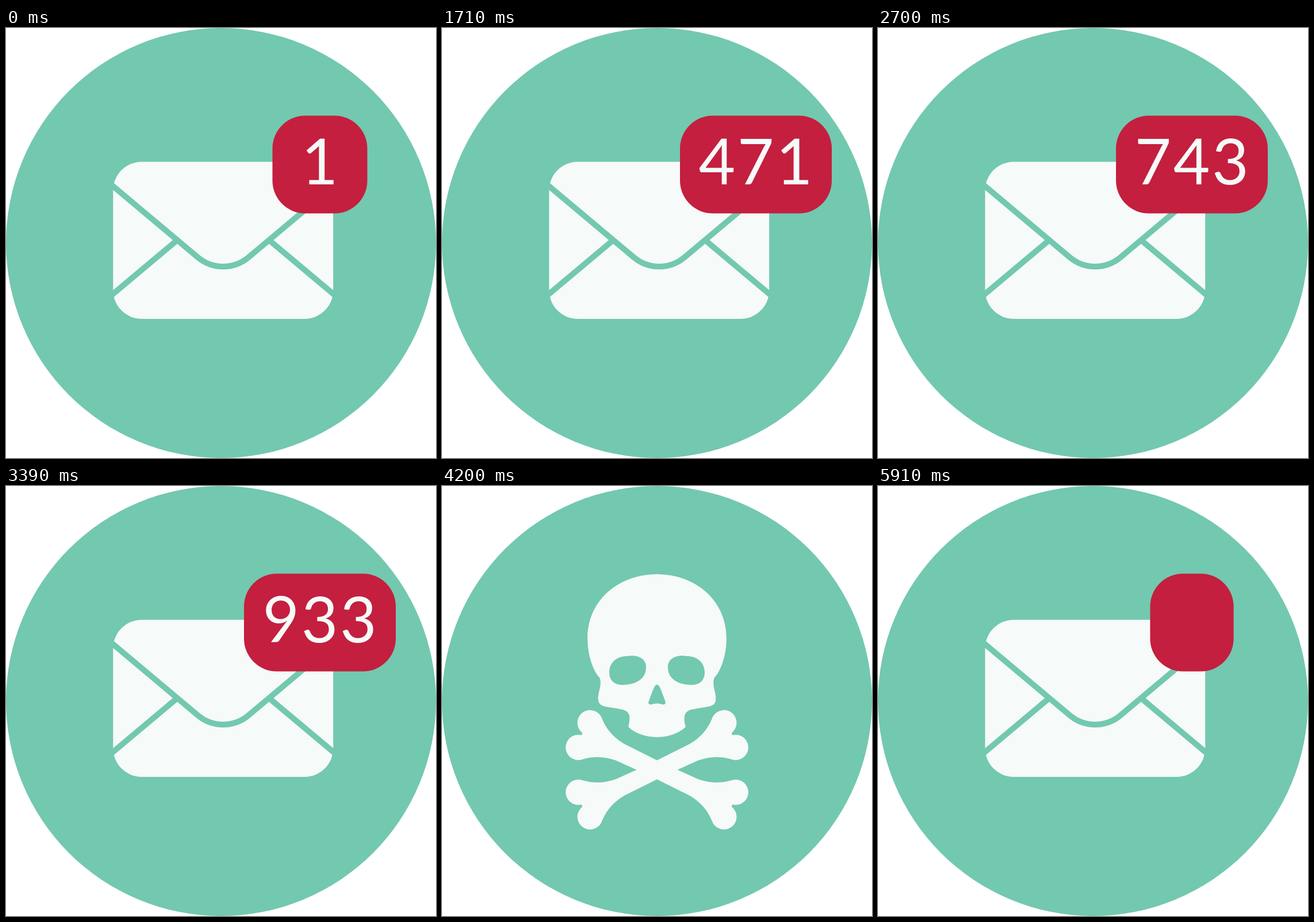
These frames come from a looping animation (748 by 748 pixels, 5.94 s). An HTML page with a canvas:

```html
<!DOCTYPE html>
<html lang="en">
<head>
<meta charset="utf-8">
<title>Inbox counter</title>
<style>
  html, body { margin: 0; width: 100%; height: 100%; overflow: hidden; background: #fff; }
  canvas { display: block; width: 748px; height: 748px; }
</style>
</head>
<body>
<canvas id="stage" width="748" height="748"></canvas>
<script>
const ctx = document.getElementById('stage').getContext('2d');
const MID = 374, STEP = 30, LOOP = 198;
const GREEN = [115, 200, 176], PAPER = [246, 250, 249], RED = [196, 31, 62];
const green = mix(GREEN, 1);

const skull = new Path2D(
  'M0 281C28 281 51 300 51 328C51 340 47 352 42 357C40 363 44 368 43 374' +
  'C42 379 35 378 27 380C18 381 20 388 21 393C16 398 8 400.5 0 400.5Z');
const eye = new Path2D('M8 349C8 343 14 340 21 341C30 341 35 346 35 353C35 360 30 363 22 362C14 361 8 357 8 349Z');
const nose = new Path2D('M0 362Q1.5 362 3 366L6 374Q7 377 4 376.5Q0 375 -4 376.5Q-7 377 -6 374L-3 366Q-1.5 362 0 362Z');
const halfBone = new Path2D('M-1 -6.2L30 -6.8Q43 -8 52 -16L61 -10V10L52 16Q43 8 30 6.8L-1 6.2Z');

// Fading over the flat green disc equals blending towards it.
function mix(color, a) {
  return 'rgb(' + color.map((c, i) => Math.round(GREEN[i] + (c - GREEN[i]) * a)) + ')';
}

function scaled(s, draw) {
  ctx.save();
  ctx.translate(MID, MID);
  ctx.scale(s, s);
  ctx.translate(-MID, -MID);
  draw();
  ctx.restore();
}

function roundBox(x, y, w, h, r, color) {
  ctx.fillStyle = color;
  ctx.beginPath();
  ctx.roundRect(x, y, w, h, r);
  ctx.fill();
}

function drawEnvelope(a) {
  const cx = 377.75;
  roundBox(186.3, 232.7, 382.9, 273.3, 50, mix(PAPER, a));
  ctx.strokeStyle = green;
  ctx.lineWidth = 10;
  ctx.beginPath();
  ctx.moveTo(cx - 202, 266.3);
  ctx.arcTo(cx, 436, cx + 202, 266.3, 68.6);
  ctx.lineTo(cx + 202, 266.3);
  for (const side of [-1, 1]) {
    ctx.moveTo(cx + side * 202, 471.4);
    ctx.lineTo(cx + side * 81, 369.8);
  }
  ctx.stroke();
}

function drawBadge(w, a) {
  roundBox(546 - w / 2, 152.5, w, 170, Math.min(57, w / 2), mix(RED, a));
}

function drawCount(n) {
  const digits = String(n);
  ctx.fillStyle = mix(PAPER, 1);
  ctx.font = '400 110px Lato, Carlito, sans-serif';
  ctx.textAlign = 'center';
  [...digits].forEach((d, i) =>
    ctx.fillText(d, 545.7 + (i - (digits.length - 1) / 2) * 67.3, 272));
}

function drawSkull(a) {
  const ink = mix(PAPER, a);
  const part = (path, color, flip) => {
    ctx.save();
    ctx.translate(MID, 0);
    ctx.scale(flip, 1);
    ctx.fillStyle = color;
    ctx.fill(path);
    ctx.restore();
  };
  for (const flip of [-1, 1]) part(skull, ink, flip);
  ctx.fillStyle = ink;
  ctx.fillRect(MID - 1, 281, 2, 119.5);
  for (const flip of [-1, 1]) part(eye, green, flip);
  part(nose, green, 1);

  const tilt = 0.445;
  for (const angle of [tilt, -tilt, Math.PI - tilt, Math.PI + tilt]) {
    ctx.save();
    ctx.translate(MID, 424.5);
    ctx.rotate(angle);
    ctx.fillStyle = ink;
    ctx.fill(halfBone);
    for (const v of [-10, 10]) {
      ctx.beginPath();
      ctx.arc(59.2, v, 9.3, 0, Math.PI * 2);
      ctx.fill();
    }
    ctx.restore();
  }
}

const SMALL = 0.422;   // scale at which the skull paths are drawn

function envelopeScale(k) {
  if (k <= 122) return 1;
  if (k < 134) return (134 - k) / 12;
  return k > 189 ? (k - 189) / 8 : 0;
}

function skullScale(k) {
  if (k > 134 && k < 140) return (k - 134) / 5 * SMALL;
  if (k >= 140 && k < 181) return 1;
  if (k >= 181 && k < 186) return (186 - k) / 5 * SMALL;
  return 0;
}

function badgeWidth(k) {
  if (k < 122) return Math.min(264, 165 + 19.8 * k);
  return k > 189 ? 165 + 19.8 * (k - LOOP) : 0;
}

function render(ms) {
  const k = Math.floor(ms / STEP) % LOOP;
  ctx.fillStyle = '#fff';
  ctx.fillRect(0, 0, 748, 748);
  ctx.fillStyle = green;
  ctx.beginPath();
  ctx.arc(MID, MID, MID, 0, Math.PI * 2);
  ctx.fill();

  const env = envelopeScale(k), bones = skullScale(k), width = badgeWidth(k);
  if (env > 0) scaled(env, () => {
    drawEnvelope(env);
    if (width > 0) drawBadge(width, env);
    if (k < 122) drawCount(Math.round(1 + k * 998 / 121));
  });
  if (bones > 0) scaled(bones / SMALL, () => drawSkull(bones));
}

const start = performance.now();
function tick() {
  render(performance.now() - start);
  requestAnimationFrame(tick);
}
tick();
</script>
</body>
</html>
```
